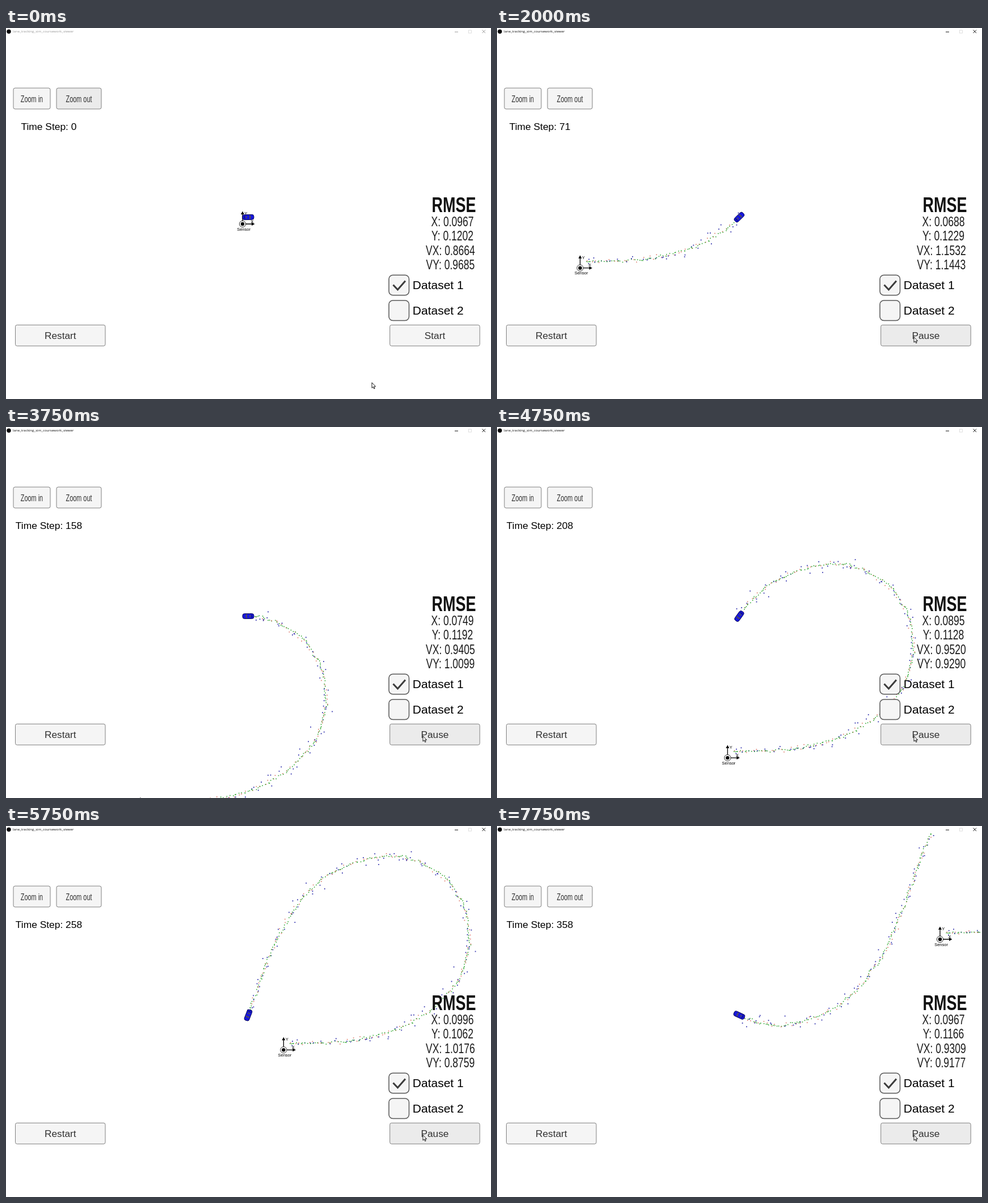
An HTML page with a canvas that plays this animation: 855 px wide and 655 px high, repeating every 8 s.

```html
<!DOCTYPE html>
<html lang="en">
<head>
<meta charset="utf-8">
<title>Tracking simulator</title>
<style>
  html, body { margin: 0; width: 100%; height: 100%; overflow: hidden; background: #fff; }
  canvas, svg { position: absolute; left: 0; top: 0; width: 855px; height: 655px; }
  text { font-family: "Liberation Sans", Arial, sans-serif; text-anchor: middle; }
  .btn rect { fill: #f5f5f5; stroke: #808080; }
  .btn.on rect { fill: #ebebeb; }
  .btn text { font-size: 17.3px; fill: #323232; }
  .btn .zoom { font-size: 16px; }
  .box { fill: #f5f5f5; stroke: #585858; stroke-width: 1.5; }
  .label { font-size: 21px; text-anchor: start; }
  .value { font-size: 24px; fill: #1c1c1c; }
  .head { font-size: 37px; font-weight: bold; fill: #111; }
  .axis { font-size: 7.5px; }
  #title { --ink: #111; }
  #title.idle { --ink: #999; }
  #title text { font: 6.1px "Open Sans", "Noto Sans", sans-serif; text-anchor: start; fill: var(--ink); }
  #title path { stroke: var(--ink); fill: none; }
</style>
</head>
<body>
<canvas id="trail" width="855" height="655"></canvas>
<svg viewBox="0 0 855 655">
  <g id="sensor">
    <path d="M0 0V-18M0 0H17" stroke="#000" stroke-width="1.3"/>
    <path d="M-3-17L0-22.500L3-17ZM16-3L21.500 0L16 3Z"/>
    <circle r="5.600" fill="#fff" stroke="#000" stroke-width=".8"/>
    <circle r="3.200"/>
    <text class="axis" x="5.800" y="-16">Y</text>
    <text class="axis" x="17" y="-2.500">X</text>
    <text class="axis" x="2" y="11.500">Sensor</text>
  </g>
  <g id="car">
    <rect x="-10" y="-4.500" width="20" height="9" rx="3.500" fill="#1717dc" stroke="#06064e" stroke-width=".9"/>
    <path d="M-6-2.800Q-7.500 0-6 2.800" fill="none" stroke="#101048"/>
    <path d="M1.500-3Q4 0 1.500 3L3.500 3.300Q5.500 0 3.500-3.300Z" fill="#5c573c"/>
    <rect x="-4" y="-2" width="1.500" height="4" fill="#5c573c"/>
  </g>
  <g id="ui">
    <path d="M682.500 453.500L690.500 462L704 446.500" fill="none" stroke="#3c3c3c" stroke-width="3"/>
    <text id="step" x="75.500" y="179.500" font-size="17.400"></text>
  </g>
  <g id="title">
    <rect width="855" height="13" fill="#fff"/>
    <circle cx="5" cy="6.300" r="3.700"/>
    <text x="12" y="8.300">lane_tracking_sim_coursework_viewer</text>
    <path d="M791 7H797M839.500 3.500L845 9M845 3.500L839.500 9"/>
    <rect x="815.500" y="4" width="5" height="5" fill="none" stroke="#d0d0d0" stroke-width=".7"/>
  </g>
  <path id="cursor" d="M0 0V9.500L2.200 7.600L3.800 11L5.200 10.300L3.700 7H6.600Z" fill="#fff" stroke="#000" stroke-width=".9"/>
</svg>
<script>
const LOOP = 8000, TICK = 250, LAST = 358;
const CAR = { x: 427, y: 334 };
const $ = id => document.getElementById(id);
const lerp = (a, b, k) => a + (b - a) * k;

// Evenly timed waypoints relative to the sensor; the last one only sets the exit direction
const route = [
  [10, -12], [110, -15], [209, -40], [296, -107], [328, -197], [295, -292], [208, -341], [104, -322],
  [29, -261], [-25, -167], [-59, -70], [-101, 26], [-167, 108], [-263, 150], [-354, 134], [-438, 66]
];
const LEGS = route.length - 2;

// Catmull-Rom curve through the waypoints
function position(step) {
  const s = Math.max(0, step) / LAST * LEGS;
  const i = Math.min(LEGS - 1, Math.floor(s)), u = s - i;
  const [p, a, b, n] = [Math.max(0, i - 1), i, i + 1, i + 2].map(k => route[k]);
  const [x, y] = [0, 1].map(c => a[c] + u / 2 * (b[c] - p[c]
    + u * (2 * p[c] - 5 * a[c] + 4 * b[c] - n[c] + u * (3 * (a[c] - b[c]) + n[c] - p[c]))));
  return { x, y };
}

// Error readouts at a few key steps
const keys = [0, 71, 158, 208, 258, 308, 358];
const errors = {
  X: [.0967, .0688, .0749, .0895, .0996, .0946, .0967],
  Y: [.1202, .1229, .1192, .1128, .1062, .1068, .1166],
  VX: [.8664, 1.1532, .9405, .9520, 1.0176, .9575, .9309],
  VY: [.9685, 1.1443, 1.0099, .9290, .8759, .8992, .9177]
};
function readout(name, step) {
  const i = Math.max(0, keys.findIndex(k => k >= step) - 1);
  const v = errors[name];
  return lerp(v[i], v[i + 1], (step - keys[i]) / (keys[i + 1] - keys[i])).toFixed(4);
}

let seed = 20;
function random() {
  seed = seed + 0x6D2B79F5 | 0;
  let r = Math.imul(seed ^ seed >>> 15, 1 | seed);
  r = r + Math.imul(r ^ r >>> 7, 61 | r) ^ r;
  return ((r ^ r >>> 14) >>> 0) / 4294967296;
}
const gauss = () => Math.sqrt(-2 * Math.log(1 - random())) * Math.cos(2 * Math.PI * random());

// Each step gives a radar or laser reading and a filtered estimate
const dots = [];
let ex = 0, ey = 0;
for (let i = 0; i <= LAST; i++) {
  const { x, y } = position(i);
  let reading;
  if (i % 2) {
    const r = Math.hypot(x, y) + gauss() * 4.8, a = Math.atan2(y, x) + gauss() * .025;
    reading = { x: r * Math.cos(a), y: r * Math.sin(a), size: 1.8, color: '#3434ae' };
  } else {
    reading = { x: x + gauss() * 2.3, y: y + gauss() * 2.3, size: 1.6, color: '#dc7464' };
  }
  ex = ex * .5 + gauss() * 1.2;
  ey = ey * .5 + gauss() * 1.2;
  dots.push([reading, { x: x + ex, y: y + ey, size: 1.6, color: '#33a833' }]);
}

const NS = 'http://www.w3.org/2000/svg';
function add(parent, tag, attrs, text = '') {
  const el = document.createElementNS(NS, tag);
  for (const k in attrs) el.setAttribute(k, attrs[k]);
  el.textContent = text;
  parent.append(el);
  return el;
}

function button(x, y, w, text, zoom) {
  const g = add($('ui'), 'g', { class: 'btn' });
  add(g, 'rect', { x, y, width: w, height: 37, rx: 3 });
  const place = `translate(${x + w / 2} ${y + 24.5})`;
  const label = add(g, 'text', { class: zoom ? 'zoom' : '', transform: place + (zoom ? ' scale(.68 1)' : '') }, text);
  return { g, label };
}
button(13, 106, 65, 'Zoom in', true);
const zoomOut = button(89, 106, 79, 'Zoom out', true);
button(16.5, 524.3, 158.5, 'Restart');
const run = button(676.7, 524.3, 158.5, 'Start');

for (const n of [1, 2]) {
  const y = 391.5 + 44.75 * n;
  $('ui').prepend(add($('ui'), 'rect', { class: 'box', x: 675, y, width: 35.5, height: 35.5, rx: 7 }));
  add($('ui'), 'text', { class: 'label', x: 716.8, y: y + 24.5 }, 'Dataset ' + n);
}

const panel = (x, y, cls, text) =>
  add($('ui'), 'text', { class: cls, transform: `translate(${x} ${y}) scale(.73 1)` }, text);
panel(789.5, 325.3, 'head', 'RMSE');
const rows = Object.keys(errors).map((name, i) =>
  ({ name, el: panel(i < 2 ? 787 : 783.4, 349.8 + 25.4 * i, 'value') }));

const ctx = $('trail').getContext('2d');

function draw(t) {
  const step = Math.max(0, Math.floor(t / 20 - 29));
  const started = t >= 500;
  const at = position(step), next = position(step + .1);
  const ox = CAR.x - at.x, oy = CAR.y - at.y;

  ctx.clearRect(0, 0, 855, 655);
  for (const d of dots.slice(1, step + 1).flat()) {
    ctx.fillStyle = d.color;
    ctx.fillRect(ox + d.x - d.size / 2, oy + d.y - d.size / 2, d.size, d.size);
  }

  const angle = Math.atan2(next.y - at.y, next.x - at.x) * 180 / Math.PI;
  $('sensor').setAttribute('transform', `translate(${ox} ${oy})`);
  $('car').setAttribute('transform', `translate(${CAR.x} ${CAR.y}) rotate(${angle})`);

  $('step').textContent = 'Time Step: ' + step;
  for (const { name, el } of rows) el.textContent = `${name}: ${readout(name, step)}`;

  $('title').classList.toggle('idle', !started);
  zoomOut.g.classList.toggle('on', !started);
  run.g.classList.toggle('on', started);
  run.label.textContent = started ? 'Pause' : 'Start';
  const m = Math.min(1, t / 500);
  $('cursor').setAttribute('transform', `translate(${lerp(645, 735, m)} ${lerp(626, 545.5, m)})`);
}

const start = performance.now();
let shown = -1;
function frame() {
  const t = Math.floor((performance.now() - start) % LOOP / TICK) * TICK;
  if (t !== shown) draw(shown = t);
  requestAnimationFrame(frame);
}
frame();
</script>
</body>
</html>
```
